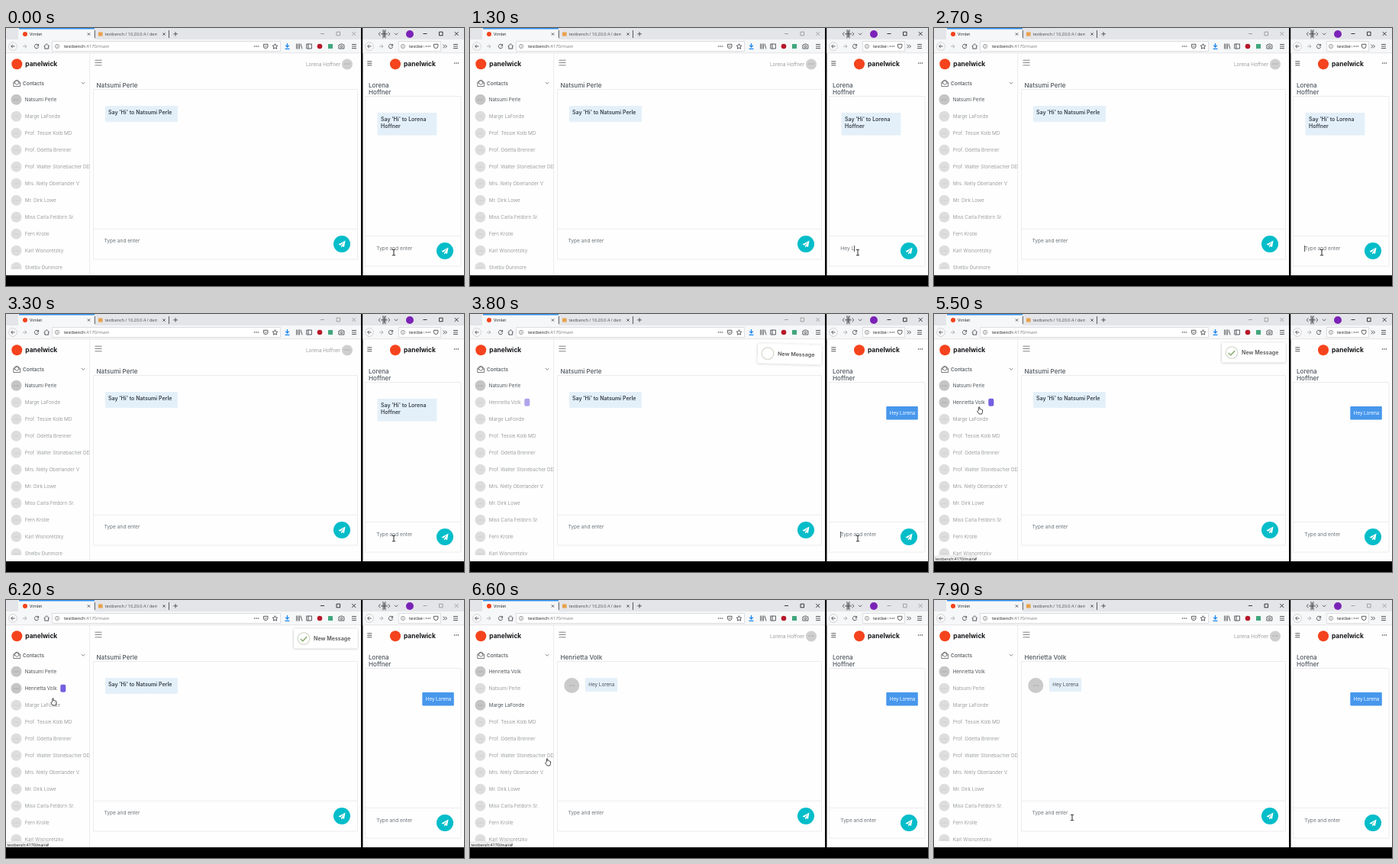
Animation, 600 px wide and 338 px high, one loop 8 s. Source, as an HTML page:

```html
<!DOCTYPE html>
<html lang="en">
<head>
<meta charset="utf-8">
<title>Chat demo</title>
<style>
html, body { margin: 0; width: 100%; height: 100%; overflow: hidden; background: #000; }
svg { display: block; width: 100vw; height: 100vh; }
text { font: 6.3px Inter, sans-serif; fill: #4c5257; white-space: pre; }
.ui { font: 5.5px "Open Sans", sans-serif; fill: #222; }
.url { font-size: 6px; }
.brand { font-weight: 700; font-size: 8.4px; fill: #16181b; }
.title { font-weight: 500; font-size: 8.1px; fill: #50575f; }
.hi { font-weight: 600; font-size: 7px; fill: #39424c; }
.field { font-size: 6.6px; fill: #6c7379; }
.tiny { font-size: 2px; fill: #999; text-anchor: middle; }
.ico { fill: none; stroke: #4a4a4f; stroke-width: .9; }
.edge { fill: none; stroke: #ececef; stroke-width: 1; }
</style>
</head>
<body>
<svg viewBox="0 0 600 338" xmlns="http://www.w3.org/2000/svg">
  <defs>
    <g id="send">
      <circle r="11" fill="#03bdc9"/>
      <path d="M4.6-4.6-4.6.6-2 1.7 3-2.9-.9 2.3-.9 4.8.6 2.9 3 3.9Z" fill="#fff"/>
    </g>
    <g id="menu"><path d="M-3-2.5h6M-3 0h6M-3 2.5h6"/></g>
    <g id="more" fill="#4a4a4f" stroke="none"><circle cx="-2.4" r=".8"/><circle r=".8"/><circle cx="2.4" r=".8"/></g>
    <g id="nav">
      <circle r="5.4" fill="#fbfbfc" stroke="#b8b8bb" stroke-width=".6"/>
      <path d="M2.7 0h-5M0-2.4-2.4 0 0 2.4"/>
      <path d="M13 0h5M15.7-2.4 18 0l-2.3 2.4" stroke="#aaa"/>
    </g>
    <g id="reload"><path d="M2-1.9A2.7 2.7 0 1 0 2.7.7M2.6-3v2.3H.4"/></g>
    <g id="x"><path d="M-1.6-1.6 1.6 1.6M1.6-1.6-1.6 1.6"/></g>
    <g id="buttons">
      <path d="M-2.5 0h5M18.5-2.3h4.6v4.6h-4.6ZM38.8-2.4l4.8 4.8M43.6-2.4l-4.8 4.8"/>
    </g>
    <clipPath id="listClip"><path d="M0 62h109.5v254H0Z"/></clipPath>
    <clipPath id="tabClip"><path d="M128 0h70v15h-70Z"/></clipPath>
    <filter id="shade" x="-20%" y="-40%" width="140%" height="190%">
      <feDropShadow dx="0" dy=".4" stdDeviation="1.7" flood-color="#000" flood-opacity=".3"/>
    </filter>
  </defs>

  <!-- Left browser -->
  <path fill="#fefefe" d="M0 0h465v324H0Z"/>
  <path fill="#e4e5e8" d="M0 0h465v15H0Z"/>
  <path fill="#f6f7f8" d="M16 0h100v15H16ZM0 15h465v18H0Z"/>
  <path fill="#2f8fee" d="M17 0h99v1.4H17Z"/>
  <path d="M0 32.7h465" stroke="#d9d9dc" stroke-width=".6"/>
  <circle cx="25" cy="8" r="3" fill="#f4431c"/>
  <text class="ui" x="31" y="10">Vimlet</text>
  <path fill="#e9a04a" d="M121 5.5h5.5v5H121Z"/>
  <text class="ui" x="129.5" y="10" clip-path="url(#tabClip)" opacity=".8">testbench / 10.20.0.4 / demo_roo</text>
  <g class="ico">
    <use href="#x" x="108.5" y="8"/><use href="#x" x="207" y="8"/>
    <path d="M219.3 7.8h5.6M222.1 5v5.6M116.3 3v10M213.5 3v10" />
    <use href="#nav" x="9" y="24"/><use href="#reload" x="40" y="24"/>
    <path d="M49.6 24l3.6-3.3 3.6 3.3M50.8 23.5v3.6h4.8v-3.6"/>
    <path d="M60.5 17.5h299v13h-299Z" fill="#fff" stroke="#d1d1d5" stroke-width=".7"/>
    <circle cx="67" cy="24" r="2.6" stroke="#777" stroke-width=".7"/><path d="M67 23.7v1.6M67 22.3v.6" stroke="#777"/>
    <use href="#more" x="328" y="24"/>
    <path d="M337.4 21.3h5.6v2.5a2.8 2.8 0 0 1-5.6 0ZM338.9 23.2l1.3 1.3 1.3-1.3"/>
    <path d="M352.5 20.7l1 2.2 2.4.3-1.8 1.6.5 2.4-2.1-1.2-2.1 1.2.5-2.4-1.8-1.6 2.4-.3Z"/>
    <path d="M368.5 20v4.8M366.2 22.7l2.3 2.4 2.3-2.4M365.6 27.3h5.8" stroke="#1684ee" stroke-width="1.2"/>
    <path d="M380.5 20.5v7M382.5 20.5v7M384.5 20.5v7M386 20.7l2 6.6M393.8 21h6.6v6h-6.6ZM396 21v6"/>
    <path d="M436 22h1.6l.7-1h2.3l.7 1h1.6v5h-7Z"/><circle cx="439.5" cy="24.4" r="1.3"/>
    <use href="#menu" x="456" y="24"/>
  </g>
  <circle cx="411" cy="24" r="3.3" fill="#b8182a"/>
  <path fill="#41a67c" d="M422 21h6v6h-6Z"/>
  <text class="ui url" x="76" y="26.2">testbench<tspan fill="#777">:4170/main</tspan></text>
  <g id="leftButtons" fill="none" stroke-width=".9"><use href="#buttons" x="414.5" y="7.5"/></g>

  <path class="edge" d="M109.6 33v291"/>
  <circle cx="14.3" cy="47.3" r="7" fill="#f5431d"/>
  <text class="brand" x="25.3" y="50.3">panelwick</text>
  <g class="ico">
    <path d="M9.8 71.3l4.4-3.3 4.4 3.3v5.2H9.8ZM9.8 71.5l4.4 2.8 4.4-2.8M11.8 72.5v-3.2h4.8v3.2" stroke-width=".7"/>
    <path d="M99 71l2.2 2.2 2.2-2.2M116.5 42.2h9M116.5 45.5h9M116.5 48.8h9" stroke="#777"/>
  </g>
  <text x="22" y="74.8" style="font-weight:500;font-size:6.5px">Contacts</text>
  <g id="list" clip-path="url(#listClip)"></g>

  <text x="393" y="49.7" fill="#999" style="fill:#9b9b9f">Lorena Hoffner</text>
  <circle cx="447" cy="47.5" r="7" fill="#cfcfcf"/><text class="tiny" x="447" y="48.2">60 x 60</text>
  <text class="title" id="peer" x="118.5" y="77.6"></text>
  <path class="edge" d="M114.5 80.5h346v222.5h-346ZM114.5 263.2h346"/>
  <g id="leftHi">
    <rect x="130" y="102" width="95" height="21" rx="1" fill="#e4f0f9"/>
    <text class="hi" x="134" y="113.2">Say 'Hi' to Natsumi Perle</text>
  </g>
  <g id="leftMsg">
    <circle cx="133.3" cy="112" r="10" fill="#cacaca"/><text class="tiny" x="133.3" y="112.8">60 x 60</text>
    <rect x="151" y="102" width="42" height="18" rx="1" fill="#e4f0f9"/>
    <text x="155.3" y="113.2">Hey Lorena</text>
  </g>
  <text class="field" x="128.5" y="281.4">Type and enter</text>
  <path id="leftCaret" d="M128.5 275.5v7.5" stroke="#222" stroke-width=".8"/>
  <use href="#send" x="440" y="283"/>
  <g id="status">
    <path d="M0 317h55.5v7H0Z" fill="#f1f1f2" stroke="#d0d0d2" stroke-width=".5"/>
    <text class="ui" x="1.5" y="322.6" style="font-size:5.2px">testbench:4170/main#</text>
  </g>

  <g id="toast">
    <rect x="377" y="37.8" width="83.5" height="25.5" rx="1.5" fill="#fff" filter="url(#shade)"/>
    <circle cx="390" cy="50.5" r="7.8" fill="none" stroke="#dadfd2" stroke-width="1.5"/>
    <path id="tick" d="M385.8 51l3 2.9 5.4-5.8" fill="none" stroke="#93b27c" stroke-width="1.7" pathLength="1" stroke-dasharray="1 2"/>
    <text x="403" y="53" style="font-weight:600;font-size:7.1px;fill:#555">New Message</text>
  </g>

  <!-- Right browser -->
  <path d="M465 0h3v338h-3Z"/>
  <path fill="#fefefe" d="M467.5 0H600v324H467.5Z"/>
  <path fill="#e4e5e8" d="M467.5 0H600v15H467.5Z"/>
  <path fill="#f6f7f8" d="M467.5 15H600v18H467.5Z"/>
  <path d="M467.5 32.7H600" stroke="#d9d9dc" stroke-width=".6"/>
  <circle cx="529" cy="8" r="5" fill="#7b23b8"/>
  <g class="ico">
    <path d="M490.5 5.4L488 7.8l2.5 2.4M500.5 5.4l2.5 2.4-2.5 2.4M509 6.7l2.2 2.2 2.2-2.2M491 7.8h9M495.5 3.5v8.6M494 2v11.5M497 2v11.5"/>
    <use href="#nav" x="476" y="24"/><use href="#reload" x="504" y="24"/>
    <path d="M514.5 17.5h55v13h-55Z" fill="#fff" stroke="#d1d1d5" stroke-width=".7"/>
    <circle cx="520" cy="24" r="2.6" stroke="#777" stroke-width=".7"/><path d="M520 23.7v1.6M520 22.3v.6" stroke="#777"/>
    <use href="#more" x="553" y="24"/>
    <path d="M560.5 21.3h5.4v2.5a2.7 2.7 0 0 1-5.4 0Z"/>
    <path d="M572.5 21.7l2.2 2.3-2.2 2.3M575.3 21.7l2.2 2.3-2.2 2.3"/>
    <use href="#menu" x="589" y="24"/><use href="#menu" x="476.3" y="46.3"/><use href="#more" x="590" y="46"/>
  </g>
  <text class="ui url" x="528" y="26.2">testbe<tspan fill="#aaa">n</tspan></text>
  <g id="rightButtons" fill="none" stroke-width=".9"><use href="#buttons" x="549" y="7.5"/></g>
  <circle cx="510" cy="47.3" r="7" fill="#f5431d"/>
  <text class="brand" x="521" y="50.3">panelwick</text>
  <text class="title" x="475" y="77.6">Lorena<tspan x="475" y="87.2">Hoffner</tspan></text>
  <path class="edge" d="M470.5 89.5h125.5v222.5h-125.5ZM470.5 272.4H596"/>
  <g id="rightHi">
    <rect x="486.5" y="111" width="78" height="29.5" rx="1" fill="#e4f0f9"/>
    <text class="hi" x="491" y="122.3">Say 'Hi' to Lorena<tspan x="491" y="130.9">Hoffner</tspan></text>
  </g>
  <g id="rightMsg">
    <rect x="545.3" y="121" width="41.5" height="17.5" rx="1" fill="#4797ec"/>
    <text x="549.8" y="132" style="fill:#fff;font-size:6.2px">Hey Lorena</text>
  </g>
  <text class="field" id="input" x="485.3" y="291.2"></text>
  <path id="caret" d="M0 285v8" stroke="#222" stroke-width=".8"/>
  <use href="#send" x="575" y="292"/>
  <path d="M0 324h600v14H0Z"/>

  <g id="mouse">
    <path id="beam" d="M-2-3.7h1.2L0-3.1l.8-.6H2M0-3.1v6.4M-2 3.8h1.2L0 3.2l.8.6H2" fill="none" stroke="#111" stroke-width=".9"/>
    <path id="arrow" d="M-2.5-4.5v8.4l2-1.8 1.4 3 1.3-.6L.9 1.6h2.7Z" fill="#fff" stroke="#111" stroke-width=".7"/>
    <path id="hand" d="M-1.5.2v-4.1q.7-1 1.4 0v2.6q.8-.6 1.3.2.8-.5 1.2.3.9-.3 1.1.6v2.5L2.7 5h-3.6L-3.4 1.6q.2-1.1 1-.6Z" fill="#fff" stroke="#111" stroke-width=".75"/>
  </g>
</svg>
<script>
const LOOP = 8000, MESSAGE = 3500, HOVER = 5300, FOCUS = 5850, OPEN = 6250, SENT = 2340, BLINK = 530;
const $ = id => document.getElementById(id);
const show = (id, on) => $(id).setAttribute('visibility', on ? 'visible' : 'hidden');
const clamp = v => Math.max(0, Math.min(1, v));
const smooth = v => v * v * (3 - 2 * v);

const first = 'Natsumi Perle', sender = 'Henrietta Volk';
const others = ['Marge LaFonde', 'Prof. Tessie Kolb MD', 'Prof. Odetta Brenner',
  'Prof. Walter Stonebacher DD', 'Mrs. Nelly Oberlander V', 'Mr. Dirk Lowe',
  'Miss Carla Feldorn Sr.', 'Fern Krolle', 'Karl Wisnoretzky', 'Shelby Dunmore'];
const names = [first, sender, ...others];
$('list').innerHTML = names.map((name, i) => `<g id="row${i}">
  <circle cx="13.5" r="7" fill="#c5c5c5"/><text class="tiny" x="13.5" y=".8">60 x 60</text>
  <text x="24.7" y="2.3">${name}</text>
  ${name === sender ? '<rect id="badge" x="71.3" y="-5" width="7" height="10" rx="2" fill="#745fe0"/>' : ''}</g>`).join('');

// Each key is [time, ...values].
function track(keys, t) {
  let i = 0;
  while (i < keys.length - 2 && t >= keys[i + 1][0]) i++;
  const [a, b] = [keys[i], keys[i + 1]];
  const k = smooth(clamp((t - a[0]) / (b[0] - a[0])));
  return a.slice(1).map((v, j) => v + (b[j + 1] - v) * k);
}
const path = [[0, 508, 294], [4150, 508, 294], [4400, 430, 272], [5300, 62, 117], [5500, 60, 126],
  [5950, 60, 126], [6400, 64, 138], [6600, 102, 212], [7100, 181, 285], [LOOP, 181, 285]];
const wobble = [[0, -4.5, 2], [165, 0, -2], [330, 2.2, 2], [500, 0, 0]];
const keyTimes = [500, 700, 900, 1100, 1300, 1400, 1500, 1600, 1900, 2000];

function drawList(t) {
  names.forEach((name, i) => {
    let slot = i;
    if (t < MESSAGE && i > 1) slot--;
    if (t >= OPEN && i < 2) slot = 1 - i;
    let glow = 0;
    if (i === 0) glow = t < OPEN ? 1 : 0;
    if (i === 1) glow = clamp((t - HOVER) / 150);
    if (i === 2) glow = clamp((t - 6400) / 100) * clamp((6750 - t) / 140);
    const row = $('row' + i);
    row.setAttribute('transform', `translate(0 ${93.8 + 22 * slot})`);
    row.setAttribute('opacity', .56 + .44 * glow);
    show('row' + i, i !== 1 || t >= MESSAGE);
  });
  show('badge', t >= MESSAGE && t < OPEN);
}

function drawInput(t) {
  const typed = t < SENT ? 'Hey Lorena'.slice(0, keyTimes.filter(k => t >= k).length) : '';
  const input = $('input');
  input.textContent = typed || 'Type and enter';
  const x = 485.6 + (typed ? input.getComputedTextLength() : 0);
  $('caret').setAttribute('transform', `translate(${x} 0)`);
  const lit = t < SENT ? t >= 300 : Math.floor((t - SENT) / BLINK) % 2 === 0;
  show('caret', lit && t < FOCUS);
  show('leftCaret', t >= 7100 && t < 7640);
}

function drawToast(t) {
  const [y, turn] = track(wobble, t - MESSAGE);
  const out = clamp((t - 6420) / 100);
  $('toast').setAttribute('transform', `translate(0 ${y}) rotate(${turn + out} 418.7 50.5)`);
  $('toast').setAttribute('opacity', 1 - out);
  $('tick').setAttribute('stroke-dashoffset', 1 - clamp((t - 3850) / 400));
  show('toast', t >= MESSAGE && out < 1);
  show('tick', t > 3850 && out < 1);
}

function drawMouse(t) {
  const [x, y] = track(path, t);
  const hand = x < 110 && y > 64;
  const beam = (x > 124 && x < 425 && y > 268) || (x > 480 && y > 276);
  $('mouse').setAttribute('transform', `translate(${x} ${y})`);
  show('hand', hand);
  show('beam', beam);
  show('arrow', !hand && !beam);
}

function draw(t) {
  const opened = t >= OPEN, arrived = t >= MESSAGE, leftActive = t >= FOCUS;
  drawList(t);
  drawInput(t);
  drawToast(t);
  drawMouse(t);
  $('peer').textContent = opened ? sender : first;
  show('leftHi', !opened);
  show('leftMsg', opened);
  show('rightHi', !arrived);
  show('rightMsg', arrived);
  show('status', t >= HOVER && t < 6850);
  $('leftButtons').setAttribute('stroke', leftActive ? '#222' : '#999');
  $('rightButtons').setAttribute('stroke', leftActive ? '#999' : '#222');
}

const start = performance.now();
function tick() {
  draw((performance.now() - start) % LOOP);
  requestAnimationFrame(tick);
}
tick();
</script>
</body>
</html>
```
